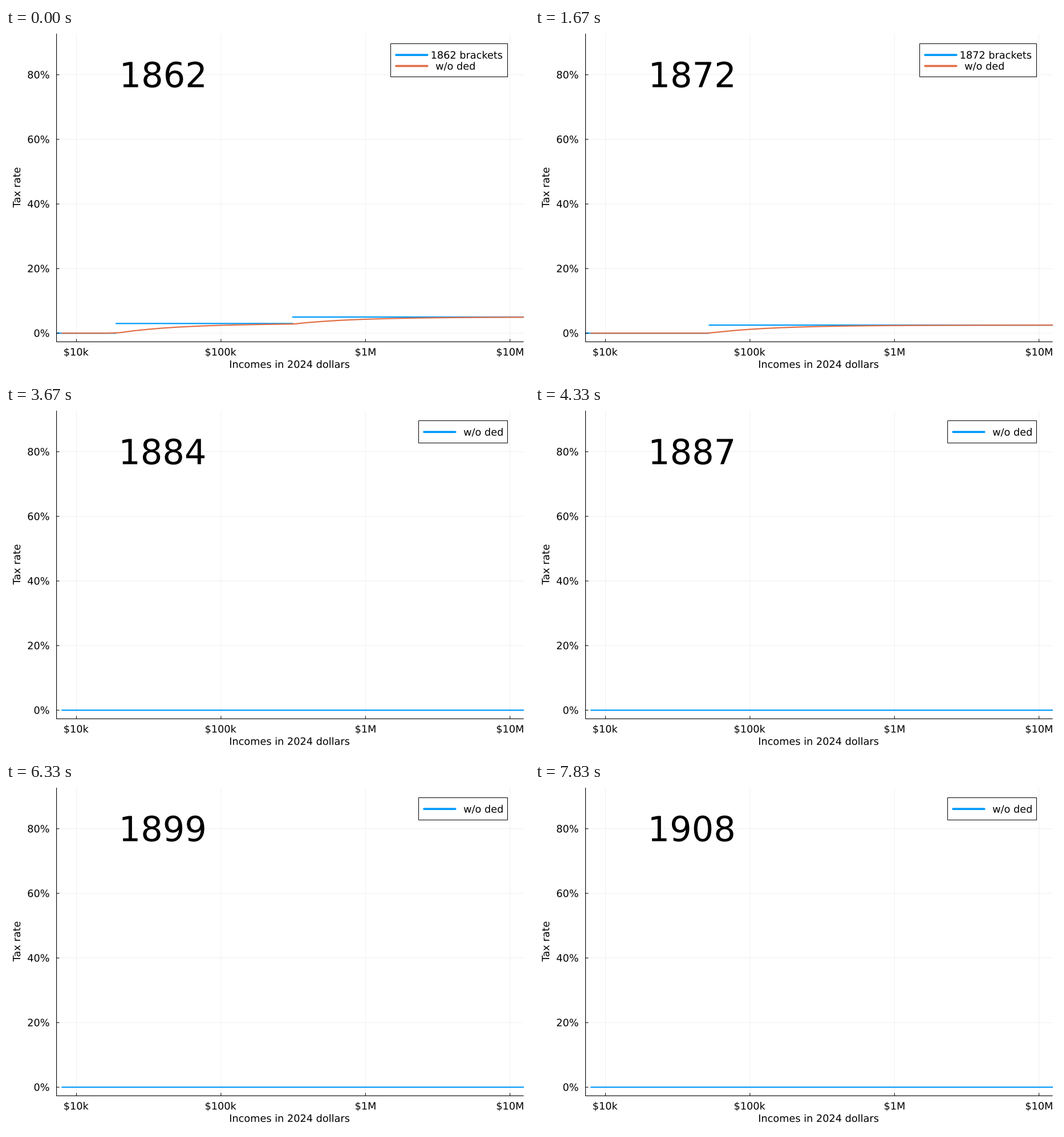
A matplotlib script for the animation above (8000 ms loop, 917 by 611 pixels).

```python
import numpy as np
import matplotlib.pyplot as plt
from matplotlib.animation import FuncAnimation
from matplotlib.patches import PathPatch, Rectangle
from matplotlib.textpath import TextPath
from matplotlib.transforms import Affine2D

plt.rcParams["font.family"] = "DejaVu Sans"
plt.rcParams["path.snap"] = False

W, H, DPI = 917, 611, 64
PT = 72 / DPI                       # points per pixel
LEFT, RIGHT, TOP, BOTTOM = 88.6, 907.6, 10, 549.4
BLUE, ORANGE = "#009afa", "#e36f47"
SIZE, BIG = 17.7, 60.6
START, YEARS = 1862, 48

# first year, last year, [(threshold in dollars of the year, rate in %)]
LAWS = [
    (1862, 1863, [(600, 3), (10000, 5)]),
    (1864, 1864, [(600, 5), (5000, 7.5), (10000, 10)]),
    (1865, 1866, [(600, 5), (5000, 10)]),
    (1867, 1869, [(1000, 5)]),
    (1870, 1872, [(2000, 2.5)]),
    (1894, 1894, [(4000, 2)]),
]
PRICES = dict(zip(range(1862, 1873),
                  [30, 37, 47, 46, 44, 42, 40, 40, 38, 36, 36]))
PRICES[1894] = 26
PRICE_NOW = 940

fig = plt.figure(figsize=(W / DPI, H / DPI), dpi=DPI, facecolor="white")
ax = fig.add_axes([0, 0, 1, 1])
ax.set_xlim(0, W)
ax.set_ylim(H, 0)
ax.axis("off")


def px(log_income):
    return 123.5 + 253.4 * (np.asarray(log_income) - 4)


def py(rate):
    return 534.3 - 5.656 * np.asarray(rate)


def line(x, y, color, width, z=1, cap="butt"):
    return ax.plot(x, y, color=color, lw=width * PT, zorder=z,
                   solid_capstyle=cap, solid_joinstyle="round")[0]


def glyphs(text, x, base, size=SIZE, align=0.5, turn=0):
    """Outline of text whose inked width is aligned on x."""
    path = TextPath((0, 0), text, size=size)
    box = path.get_extents()
    shift = -(box.x0 + align * box.width)
    move = Affine2D().translate(shift, 0).scale(1, -1).rotate_deg(-turn)
    return path.transformed(move.translate(x, base))


def label(*args, **kwargs):
    patch = PathPatch(glyphs(*args, **kwargs), fc="black", lw=0, zorder=8)
    return ax.add_patch(patch)


def draw_axes():
    for power, name in zip(range(4, 8), ["$10k", "$100k", "$1M", "$10M"]):
        x = px(power)
        line([x, x], [TOP, BOTTOM], "#efefef", 0.9)
        line([x, x], [BOTTOM, BOTTOM - 5], "black", 1, 4)
        label(name, x, 573.4)
    for rate in range(0, 81, 20):
        y = py(rate)
        line([LEFT, RIGHT], [y, y], "#efefef", 0.9)
        line([LEFT, LEFT + 5], [y, y], "black", 1, 4)
        label(f"{rate}%", 75.6, y + 6.4, align=1)
    line([LEFT, LEFT, RIGHT], [TOP, BOTTOM, BOTTOM], "black", 1.1, 4)
    label("Incomes in 2024 dollars", 497.5, 595)
    label("Tax rate", 25, 279.5, turn=90)


draw_axes()
clip = Rectangle((LEFT, TOP), RIGHT - LEFT, BOTTOM - TOP,
                 transform=ax.transData)
steps = line([], [], BLUE, 2.2, 2, "round")
curve = line([], [], ORANGE, 2.2, 3, "round")
for item in (steps, curve):
    item.set_clip_path(clip)

frame = ax.add_patch(Rectangle((0, 0), 1, 1, fc="white", ec="black",
                               lw=PT, zorder=6))
keys = [line([], [], color, 3.7, 7, "round") for color in (BLUE, ORANGE)]
names = [label("w/o ded", 0, 0) for _ in keys]
year_text = label(str(START), 276, 103.6, BIG)

GRID = np.linspace(3.9, 7.1, 33)


def brackets(year):
    for first, last, law in LAWS:
        if first <= year <= last:
            scale = PRICE_NOW / PRICES[year]
            return [(limit * scale, rate) for limit, rate in law]
    return []


def average_rate(law):
    income = 10 ** GRID
    tax, below = np.zeros_like(income), 0
    for limit, rate in law:
        tax += (rate - below) * np.maximum(income - limit, 0)
        below = rate
    return tax / income


def step_line(law):
    edges = [3.5] + [np.log10(limit) for limit, _ in law] + [7.5]
    rates = [0] + [rate for _, rate in law]
    x, y = [], []
    for a, b, rate in zip(edges, edges[1:], rates):
        x += [a, b, np.nan]
        y += [rate, rate, np.nan]
    return px(x), py(y)


def set_legend(year, taxed):
    left, bottom = (674.5, 85.5) if taxed else (723.5, 66.5)
    frame.set_bounds(left, 27.5, 879.5 - left, bottom - 27.5)
    for row, (key, name) in enumerate(zip(keys, names)):
        shown = taxed or row == 0
        key.set_visible(shown)
        name.set_visible(shown)
        y = 47.2 + 19.3 * row
        key.set_data([left + 9.5, left + 64.2], [y, y])
        if taxed and row == 0:
            text, x = f"{year} brackets", left + 72
        else:
            text, x = "w/o ded", left + 79.3
        name.set_path(glyphs(text, x, y + 6.4, align=0))


def update(i):
    year = START + i
    law = brackets(year)
    if law:
        steps.set_data(*step_line(law))
    else:
        steps.set_data([], [])
    curve.set_data(px(GRID), py(average_rate(law)))
    curve.set_color(ORANGE if law else BLUE)
    set_legend(year, bool(law))
    year_text.set_path(glyphs(str(year), 276, 103.6, BIG))
    return [steps, curve, frame, year_text, *keys, *names]


anim = FuncAnimation(fig, update, frames=YEARS, interval=8000 / YEARS,
                     init_func=lambda: update(0), repeat=True,
                     repeat_delay=0, blit=False)
plt.show()
```
